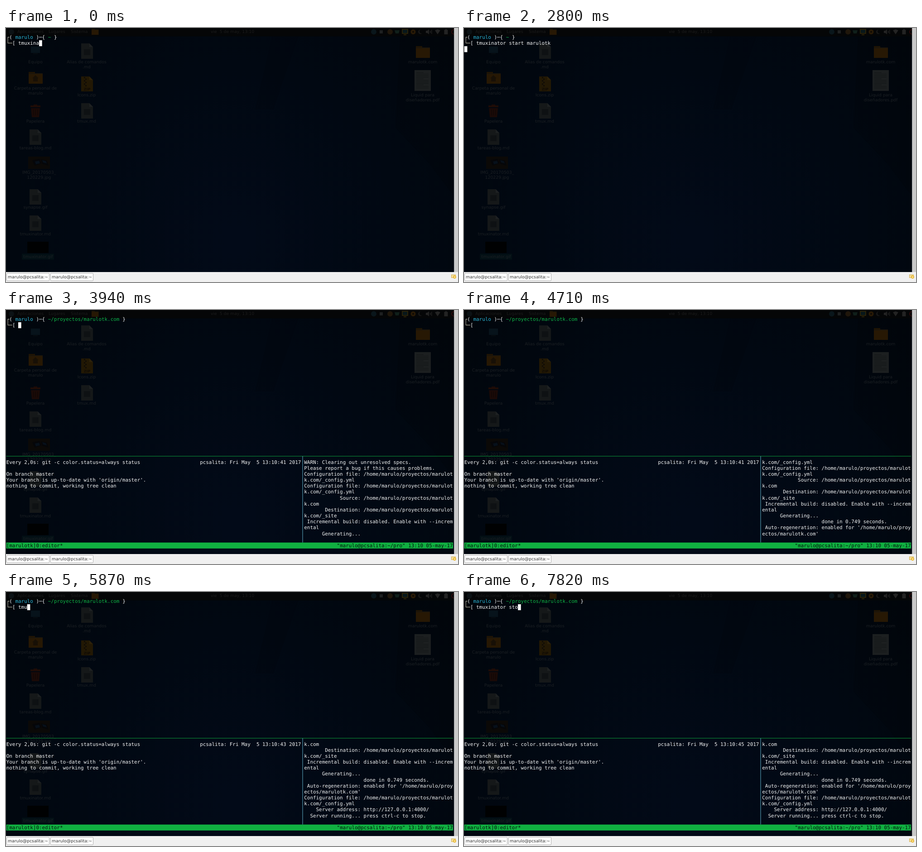
Animation, 998 px wide and 561 px high, one loop 8 s. Source, as an HTML page with a canvas:

```html
<!DOCTYPE html>
<html lang="es">
<head>
<meta charset="utf-8">
<title>Terminal</title>
<style>
  html, body { margin: 0; width: 100%; height: 100%; overflow: hidden; background: #01070f; }
  canvas { display: block; width: 998px; height: 561px; }
</style>
</head>
<body>
<canvas id="stage" width="998" height="561"></canvas>
<script>
const W = 998, H = 561, LOOP = 8000;
const S = W / 1366;                       // the desktop is a scaled 1366 px screen
const CW = 9 * S, RH = 18 * S, X0 = S, Y0 = 19 * S;
const MONO = '10.92px "DejaVu Sans Mono", monospace';
const SANS = '9.3px "DejaVu Sans", sans-serif';
const WHITE = '#f4f4f4', CREAM = '#e8dfc4', CYAN = '#2cb3d2', GREEN = '#10b245';

const USER = 'marulo', PROJECT = 'marulotk', HOST = 'pcsalita';
const SITE = PROJECT + '.com';
const DIR = '~/proyectos/' + SITE, HOME = `/home/${USER}/proyectos/${SITE}`;

const stage = document.getElementById('stage').getContext('2d');
let g = stage;

// ---------- drawing helpers ----------
function rect(x, y, w, h, color) {
  g.fillStyle = color;
  g.fillRect(x, y, w, h);
}

function poly(color, ...pts) {
  g.fillStyle = color;
  g.beginPath();
  for (let i = 0; i < pts.length; i += 2) g.lineTo(pts[i], pts[i + 1]);
  g.fill();
}

function disc(x, y, r, color) {
  g.fillStyle = color;
  g.beginPath();
  g.arc(x, y, r, 0, Math.PI * 2);
  g.fill();
}

function label(text, x, y, color = '#1c2024', align = 'center') {
  g.font = SANS;
  g.textAlign = align;
  g.textBaseline = 'alphabetic';
  g.textRendering = 'geometricPrecision';
  g.fillStyle = color;
  g.fillText(text, x, y + 3);
}

// ---------- desktop ----------
function sheet(x, y) {
  poly('#151819', x - 13, y - 17, x + 5, y - 17, x + 13, y - 9, x + 13, y + 17, x - 13, y + 17);
  poly('#1e2122', x + 5, y - 17, x + 13, y - 9, x + 5, y - 9);
  rect(x - 7, y - 4, 14, 13, '#0e1113');
}

function folder(x, y, k = 1) {
  rect(x - 15 * k, y - 13 * k, 14 * k, 6 * k, '#1f1404');
  rect(x - 15 * k, y - 10 * k, 31 * k, 23 * k, '#271804');
  rect(x - 15 * k, y - 10 * k, 31 * k, 2 * k, '#1d160b');
}

function wallpaper() {
  const glow = g.createRadialGradient(510, 470, 20, 510, 420, 640);
  glow.addColorStop(0, '#020a18');
  glow.addColorStop(0.55, '#010812');
  glow.addColorStop(1, '#01060c');
  rect(0, 0, W, H, glow);
  poly('rgba(0,3,8,.14)', 588, 19, 645, 19, 590, 180, 550, 180);
  poly('rgba(0,2,6,.14)', 870, 19, 988, 19, 988, 370, 935, 300, 860, 220);
}

function topPanel() {
  const ink = '#1c1c1c';
  rect(0, 0, W, 18.5, '#050607');
  disc(12, 8.5, 6, '#0c1215');
  label('Aplicaciones', 25, 8, ink, 'left');
  label('Lugares', 94, 8, ink, 'left');
  label('Sistema', 143, 8, ink, 'left');
  folder(196.5, 8.5, 0.5);
  label('vie  5 de may, 13:10', 500, 8, ink);
  disc(812, 8.5, 6, '#0a161b');
  rect(825, 5, 7, 7, '#1d1f20');
  disc(848, 8.5, 6, '#1f160b');
  poly('#101f1a', 858, 5, 869, 5, 867, 12, 860, 12);
  rect(874, 2, 14, 11, '#2a2208');
  rect(876, 4, 10, 7, '#08171a');
  rect(878, 14, 6, 2, '#2a2208');
  disc(899, 8.5, 5.5, '#291a06');
  disc(899, 8.5, 2, '#0e0a05');
  disc(915, 8.5, 5, '#171717');
  disc(917.5, 7.5, 4.5, '#050607');
  poly('#232323', 927, 6, 930, 6, 934, 3, 934, 14, 930, 11, 927, 11);
  rect(936, 6, 1.5, 5, '#232323');
  rect(939, 4, 1.5, 9, '#1f1f1f');
  poly('#232323', 947, 5, 953, 3, 959, 5, 953, 14);
  rect(967.5, 4, 8, 10, '#232323');
  rect(970, 2.5, 3, 2, '#232323');
  g.strokeStyle = '#360a0a';
  g.lineWidth = 1.5;
  g.beginPath();
  g.arc(989, 8.5, 5, Math.PI / 2, Math.PI * 1.5);
  g.stroke();
}

function icons() {
  rect(55, 41, 20, 14, '#07131b');
  rect(60, 56, 10, 1.5, '#090f13');
  folder(65, 110);
  poly('#181006', 58, 111, 65, 104, 72, 111, 70, 111, 70, 118, 60, 118, 60, 111);
  rect(54, 171, 22, 4, '#1e0c07');
  rect(61, 169, 8, 2, '#1e0c07');
  poly('#1a0a07', 55, 177, 75, 177, 73, 197, 57, 197);
  [60, 64.5, 69].forEach(x => rect(x, 180, 1.5, 13, '#110706'));
  for (const y of [241, 373, 431]) sheet(65, y);
  sheet(179, 51);
  sheet(179, 183);

  rect(49, 284, 48, 27, '#0b0907');
  poly('#050609', 58, 292, 74, 289, 78, 299, 63, 304);
  poly('#07101a', 64, 295, 73, 293, 75, 299, 66, 301);
  poly('#050609', 77, 290, 90, 293, 94, 304, 80, 300);
  poly('#07101a', 80, 292, 88, 294, 90, 299, 82, 297);

  rect(47, 472, 47, 25, '#000102');
  rect(35, 498.5, 71, 13, '#031015');

  poly('#221804', 166, 107, 184, 107, 192, 115, 192, 140, 166, 140);
  poly('#2d2109', 184, 107, 192, 115, 184, 115);
  for (let i = 0; i < 6; i++) rect(172 + i % 2 * 3, 108 + i * 3.6, 3, 3, '#100c06');
  g.font = 'bold 8px "DejaVu Sans", sans-serif';
  g.textAlign = 'center';
  g.fillStyle = '#100b05';
  g.fillText('ZIP', 179, 138);

  folder(920, 53);
  rect(902, 93, 36, 46, '#1c1f20');
  for (let i = 0; i < 11; i++) rect(906, 98 + i * 3.4, i % 4 === 0 ? 16 : 27, 1, '#121516');

  [['Equipo', 65, 75], ['Carpeta personal de', 65, 133], [USER, 65, 144],
   ['Papelera', 65, 206], ['tareas-blog.md', 65, 265], ['IMG_20170503_', 73, 319],
   ['120229.jpg', 73, 330], ['synapse.gif', 65, 396], ['tmuxinator.md', 65, 455],
   ['tmuxinator.gif', 71, 505], ['Alias de comandos', 178, 75], ['.md', 178, 86],
   ['Icons.zip', 178, 148], ['tmux.md', 178, 206], [SITE, 920, 75],
   ['Liquid para', 920, 148], ['diseñadores.pdf', 920, 159]
  ].forEach(args => label(...args));
}

function windowFrame() {
  rect(1354 * S, 0, 12 * S, 539, '#c9c9c9');
  rect(0, 539, W, 22, '#f0f0f0');
  for (const x of [1.5, 98.5]) {
    g.fillStyle = '#fdfdfd';
    g.strokeStyle = '#a9a9a9';
    g.lineWidth = 0.9;
    g.beginPath();
    g.roundRect(x, 541.7, 94, 16.6, 1.5);
    g.fill();
    g.stroke();
    label(`${USER}@${HOST}:~`, x + 2.5, 549.7, '#333', 'left');
  }
  rect(983.5, 545, 9, 6.5, '#f3dfa0');
  g.strokeStyle = '#d3ad4a';
  g.strokeRect(983.5, 545, 9, 6.5);
  disc(990.5, 550, 3.4, '#e8b52c');
  disc(990.5, 550, 1.5, '#fff3c4');
}

const backdrop = document.createElement('canvas');
backdrop.width = W;
backdrop.height = H;
g = backdrop.getContext('2d');
[wallpaper, topPanel, icons, windowFrame].forEach(draw => draw());
g = stage;

// ---------- terminal ----------
const colX = col => X0 + col * CW;
const rowY = row => Y0 + row * RH;

function put(text, col, row, color = WHITE) {
  g.font = MONO;
  g.textAlign = 'left';
  g.textBaseline = 'alphabetic';
  g.textRendering = 'geometricPrecision';
  g.fillStyle = color;
  g.fillText(text, colX(col), rowY(row) + 14 * S);
}

function cursor(col, row) {
  rect(colX(col), rowY(row), CW, RH, '#fff');
}

function putRun(parts, col, row) {
  for (const [text, color] of parts) {
    put(text, col, row, color);
    col += text.length;
  }
}

const promptTop = path => [['┌', CREAM], ['( ', WHITE], [USER, CYAN], [' )─{ ', WHITE],
                           [path, GREEN], [' }', WHITE]];
const promptLine = text => [['└─', CREAM], ['[ ' + text, WHITE]];

// ---------- timeline ----------
const spread = (from, to, n) => Array.from({ length: n }, (_, i) => from + (to - from) * i / (n - 1));
const passed = (times, t) => times.filter(at => t >= at - 0.01).length;

const START = `tmuxinator start ${PROJECT}`, STOP = 'tmuxinator stop';
const ENTER = 2800, TMUX = 3070;
const startKeys = [...spread(130, 1090, 8), 1270, 1450, 1630, ...spread(1760, 2270, 5), 2460, 2630];
const stopKeys = [...spread(5490, 5870, 3), ...spread(6330, 7310, 8), ...spread(7470, 7820, 3)];
const clockTicks = [5000, 7000];

// [time, lines printed so far]
const logSteps = [[TMUX, 1], [3420, 4], [3500, 9], [3590, 13], [3630, 20],
                  [4350, 21], [4710, 23], [4810, 25], [4900, 27]];
const PANE_ROWS = 13, PANE_COLS = 50;

const entry = (key, value) => (key.padStart(19) + ' ' + value).match(new RegExp(`.{1,${PANE_COLS}}`, 'g'));
const config = entry('Configuration file:', HOME + '/_config.yml');
const log = [
  'jekyll serve', '',
  promptTop(DIR), promptLine('jekyll serve'),
  'WARN: Unresolved specs during Gem::Specification.r', 'eset:',
  '      listen (< 3.1, ~> 3.0)',
  'WARN: Clearing out unresolved specs.',
  'Please report a bug if this causes problems.',
  ...config, ...config,
  ...entry('Source:', HOME),
  ...entry('Destination:', HOME + '/_site'),
  ...entry('Incremental build:', 'disabled. Enable with --incremental'),
  '      Generating...',
  ...entry('', 'done in 0.749 seconds.'),
  ...entry('Auto-regeneration:', `enabled for '${HOME}'`),
  ...config,
  ...entry('Server address:', 'http://127.0.0.1:4000/'),
  ...entry('Server running...', 'press ctrl-c to stop.')
];

function shell(t) {
  const typed = START.slice(0, 7 + passed(startKeys, t));
  putRun(promptTop('~'), 0, 0);
  putRun(promptLine(typed), 0, 1);
  if (t < ENTER) cursor(4 + typed.length, 1);
  else cursor(0, 2);
}

function editorPane(t) {
  const typed = STOP.slice(0, passed(stopKeys, t));
  const blinkOff = passed([3340, 3940, 4540, 5140], t) % 2;
  putRun(promptTop(DIR), 0, 0);
  putRun(promptLine(typed), 0, 1);
  if (!blinkOff) cursor(4 + typed.length, 1);
}

function statusPane(t) {
  const sec = 41 + 2 * passed(clockTicks, t);
  put('Every 2,0s: git -c color.status=always status', 0, 24);
  put(`${HOST}: Fri May  5 13:10:${sec} 2017`, 65, 24);
  if (t < 3340) return;
  put('On branch master', 0, 26);
  put("Your branch is up-to-date with 'origin/master'.", 0, 27);
  put('nothing to commit, working tree clean', 0, 28);
}

function serverPane(t) {
  const count = logSteps.filter(([at]) => t >= at).pop()[1];
  log.slice(Math.max(0, count - PANE_ROWS), count).forEach((line, i) => {
    putRun(typeof line === 'string' ? [[line, WHITE]] : line, 100, 24 + i);
  });
}

function tmux(t) {
  const midY = rowY(23.5), midX = colX(99.5);
  rect(X0, midY - 0.5, 150 * CW, 1, '#0c9a3a');
  rect(midX - 0.5, midY, 1, rowY(38) - midY, '#62b3cb');
  rect(X0, rowY(38), 150 * CW, RH, '#10b041');
  put(`[${PROJECT}]0:editor*`, 0, 38, '#02140a');
  put(`"${USER}@${HOST}:~/pro" 13:10 05-may-17`, 111, 38, '#02140a');
  editorPane(t);
  statusPane(t);
  serverPane(t);
}

function frame(now) {
  const t = now % LOOP;
  g.drawImage(backdrop, 0, 0);
  (t < TMUX ? shell : tmux)(t);
  requestAnimationFrame(frame);
}
requestAnimationFrame(frame);
</script>
</body>
</html>
```
